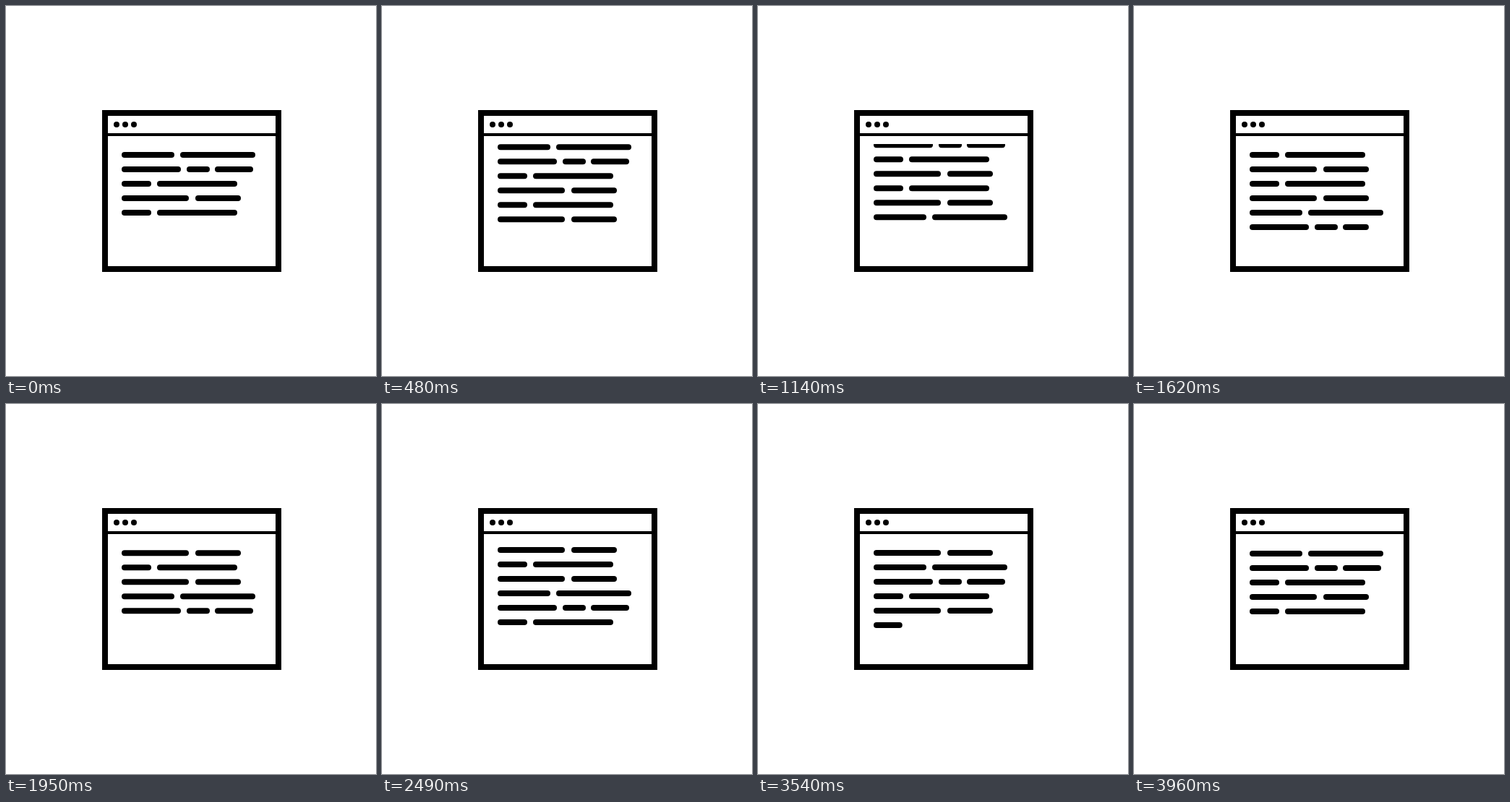
Recreate the animation shown at these times as an HTML page. Size 512 by 512 pixels, loop 3.99 s.

```html
<!DOCTYPE html>
<html lang="en">
<head>
<meta charset="utf-8">
<title>Typing window</title>
<style>
  html, body { margin: 0; width: 100%; height: 100%; overflow: hidden; background: #fff; }
  svg { display: block; width: 100vw; height: 100vh; }
  line { stroke: #000; stroke-width: 8; stroke-linecap: round; }
</style>
</head>
<body>
<svg viewBox="0 0 512 512">
  <clipPath id="page"><rect x="141" y="191" width="232" height="169"/></clipPath>
  <rect x="137" y="148" width="240" height="216" fill="#fff" stroke="#000" stroke-width="8"/>
  <rect x="141" y="176" width="232" height="4"/>
  <circle cx="153" cy="164" r="4"/>
  <circle cx="165" cy="164" r="4"/>
  <circle cx="177" cy="164" r="4"/>
  <g clip-path="url(#page)"><g id="text"></g></g>
</svg>
<script>
const LOOP = 3990, TICK = 30, SCROLL = 296, GAP = 20, TOP = 206, ROWS = 6;

// Start and end of each bar's centre line
const A = [[164, 229], [245, 341]];
const B = [[164, 238], [254, 278], [293, 338]];
const C = [[164, 197], [213, 316]];
const D = [[164, 249], [266, 321]];
const code = [A, B, C, D, C, D];

// Per step: typing starts, typing ends, scrolling starts
const steps = [
  [5, 320, 325],
  [630, 950, 955],
  [1300, 1672, 1675],
  [2045, 2400, 2405],
  [2732, 3002, 3005],
  [3412, 3702, 3702]
];

const text = document.getElementById('text');
const clamp = v => Math.min(1, Math.max(0, v));
const ease = v => v * v * (3 - 2 * v);

function makeLine() {
  const line = document.createElementNS('http://www.w3.org/2000/svg', 'line');
  return text.appendChild(line);
}
const pool = Array.from({ length: ROWS }, () => [makeLine(), makeLine(), makeLine()]);

// progress counts finished bars, so 1.5 is one bar and half of the next
function drawRow(lines, bars, y, progress) {
  lines.forEach((line, i) => {
    const bar = bars[i];
    const part = clamp(progress - i);
    line.style.display = bar && part > 0 ? '' : 'none';
    if (!bar) return;
    const [x1, x2] = bar;
    line.setAttribute('x1', x1);
    line.setAttribute('x2', x1 + (x2 - x1) * ease(part) + 0.01);
    line.setAttribute('y1', y);
    line.setAttribute('y2', y);
  });
}

function draw(t) {
  let k = steps.length - 1;
  while (k > 0 && t < steps[k - 1][2] + SCROLL) k--;
  const [from, to, scroll] = steps[k];
  const shift = GAP * ease(clamp((t - scroll) / SCROLL));
  pool.forEach((lines, i) => {
    const bars = code[(k + i) % code.length];
    const typed = i < ROWS - 1 ? 1 : clamp((t - from) / (to - from));
    drawRow(lines, bars, TOP + GAP * i - shift, typed * bars.length);
  });
}

const start = performance.now();
function frame() {
  const t = (performance.now() - start) % LOOP;
  draw(Math.floor(t / TICK) * TICK);
  requestAnimationFrame(frame);
}
frame();
</script>
</body>
</html>
```
